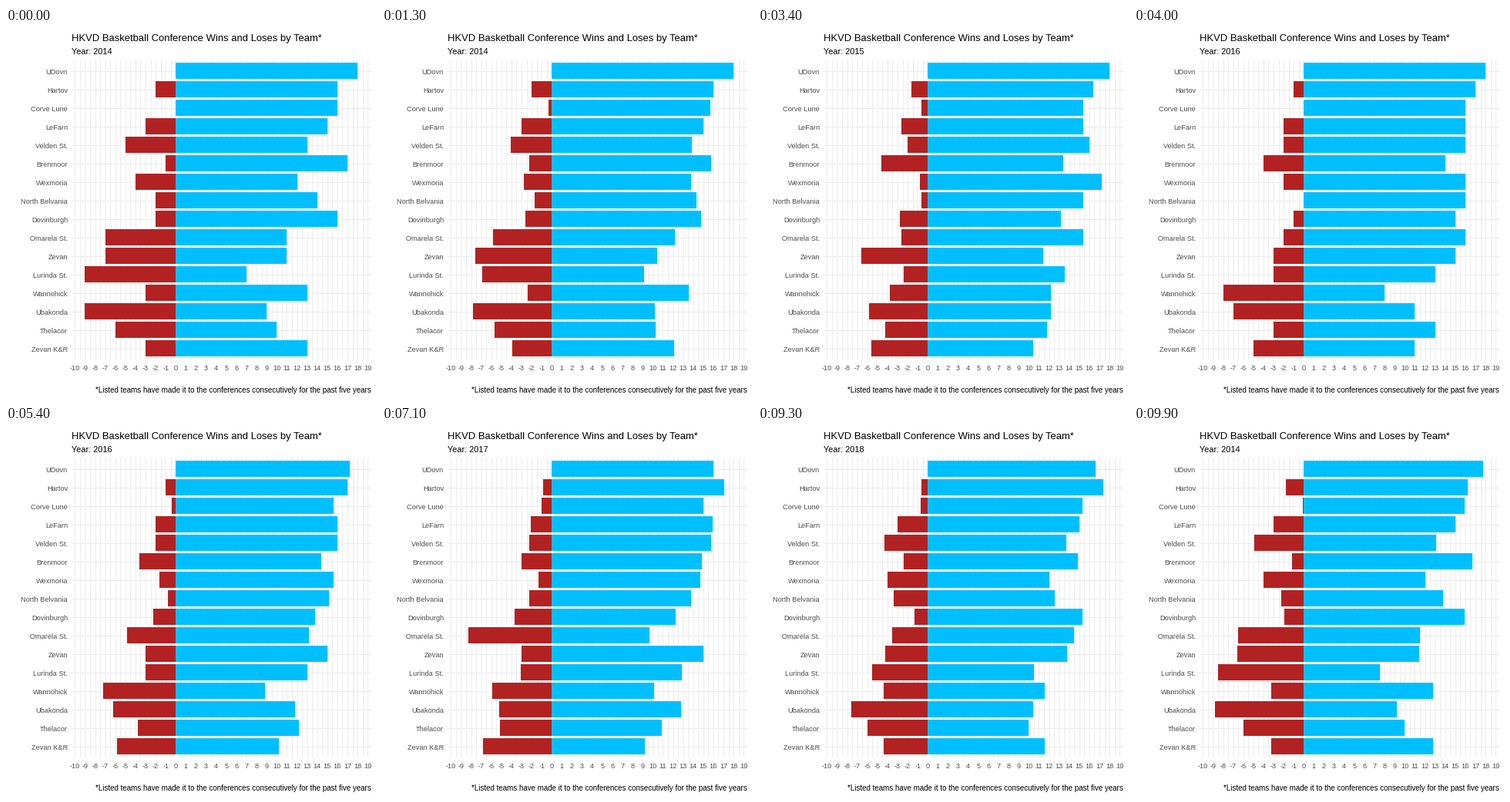
Recreate the animation shown at these times as a matplotlib script. Size 480 by 480 pixels, loop 10000 ms.

```python
import matplotlib.pyplot as plt
import numpy as np
from matplotlib.animation import FuncAnimation
from matplotlib.patches import Rectangle

SIZE, DPI = 480, 80
PT = 72 / DPI                      # points per pixel
ZERO, UNIT = 220.3, 13.1           # x axis: pixel of 0, pixels per game
TOP, PITCH = 55.5, 24              # first row centre, row spacing
LEFT, RIGHT, UPPER, LOWER = 85, 474, 41, 430
HOLD, STEPS = 10, 20               # still frames, frames per season

TEAMS = ["UDovn", "Hartov", "Corve Lune", "LeFarn", "Velden St.", "Brenmoor",
         "Wexmoria", "North Belvania", "Dovinburgh", "Omarela St.", "Zevan",
         "Lurinda St.", "Wannohick", "Ubakonda", "Thelacor", "Zevan K&R"]
YEARS = [2014, 2015, 2016, 2017, 2018]

WINS = np.array([
    [18, 16, 16, 15, 13, 17, 12, 14, 16, 11, 11, 7, 13, 9, 10, 13],
    [18, 16, 15, 15, 16, 13, 18, 15, 12, 15, 9, 14, 15, 13, 11, 10],
    [18, 17, 16, 16, 16, 14, 16, 16, 15, 16, 15, 13, 8, 11, 13, 11],
    [16, 17, 15, 16, 16, 15, 15, 14, 12, 9, 15, 13, 10, 13, 11, 9],
    [16, 18, 15, 15, 14, 14, 12, 12, 15, 16, 15, 12, 11, 11, 10, 11],
])
LOSSES = np.array([
    [0, 2, 0, 3, 5, 1, 4, 2, 2, 7, 7, 9, 3, 9, 6, 3],
    [0, 2, 1, 3, 2, 5, 0, 1, 4, 3, 9, 2, 1, 5, 5, 6],
    [0, 1, 0, 2, 2, 4, 2, 0, 1, 2, 3, 3, 8, 7, 3, 5],
    [0, 1, 1, 2, 2, 3, 1, 2, 4, 9, 3, 3, 6, 5, 5, 7],
    [0, 0, 1, 3, 4, 3, 4, 4, 1, 2, 3, 4, 5, 7, 6, 5],
])

plt.rcParams["font.family"] = "Liberation Sans"
fig = plt.figure(figsize=(SIZE / DPI, SIZE / DPI), dpi=DPI, facecolor="white")
ax = fig.add_axes([0, 0, 1, 1])
ax.set(xlim=(0, SIZE), ylim=(SIZE, 0))
ax.axis("off")


def px(games):
    return int(np.floor(ZERO + UNIT * games + 0.5))


def box(x, y, w, h, color, z):
    return ax.add_patch(Rectangle((x, y), w, h, fc=color, lw=0,
                                  antialiased=False, zorder=z))


def label(x, y, s, size, color="black", ha="left"):
    return ax.text(x, y, s, fontsize=size * PT, color=color, ha=ha,
                   va="baseline", zorder=4)


# Grid
for half in range(-20, 39):
    box(px(half / 2), UPPER, 1, LOWER - UPPER, "#EBEBEB", 1)
for i in range(len(TEAMS)):
    box(LEFT, round(TOP + 0.2 + PITCH * i), RIGHT - LEFT, 1, "#EBEBEB", 1)

# Axis labels
for i, team in enumerate(TEAMS):
    label(80, 60 + PITCH * i, team, 9.3, "#4D4D4D", "right")
for n in range(-10, 20):
    label(ZERO + UNIT * n, 444, str(n), 9.2, "#4D4D4D", "center")

label(LEFT, 17, "HKVD Basketball Conference Wins and Loses by Team*", 13.05)
subtitle = label(LEFT, 34, "", 11)
label(RIGHT, 473, "*Listed teams have made it to the conferences "
      "consecutively for the past five years", 9.75, ha="right")

# Bars
origin = px(0)
won, lost = [], []
for i in range(len(TEAMS)):
    y0 = round(TOP + PITCH * i - 10.8)
    won.append(box(origin, y0, 0, 21, "#00BFFF", 3))
    lost.append(box(origin, y0, 0, 21, "#B22222", 3))


def update(frame):
    season, k = divmod(frame, STEPS)
    after = (season + 1) % len(YEARS)
    p = max(0, k - HOLD) / (STEPS - HOLD)
    wins = WINS[season] * (1 - p) + WINS[after] * p
    losses = LOSSES[season] * (1 - p) + LOSSES[after] * p
    for bar, v in zip(won, wins):
        bar.set_width(px(v) - origin)
    for bar, v in zip(lost, losses):
        x = px(-v)
        bar.set_x(x)
        bar.set_width(origin - x)
    subtitle.set_text(f"Year: {YEARS[season if p < 0.5 else after]}")
    return [*won, *lost, subtitle]


anim = FuncAnimation(fig, update, frames=STEPS * len(YEARS), interval=100,
                     repeat=True, repeat_delay=0, blit=False)
plt.show()
```
